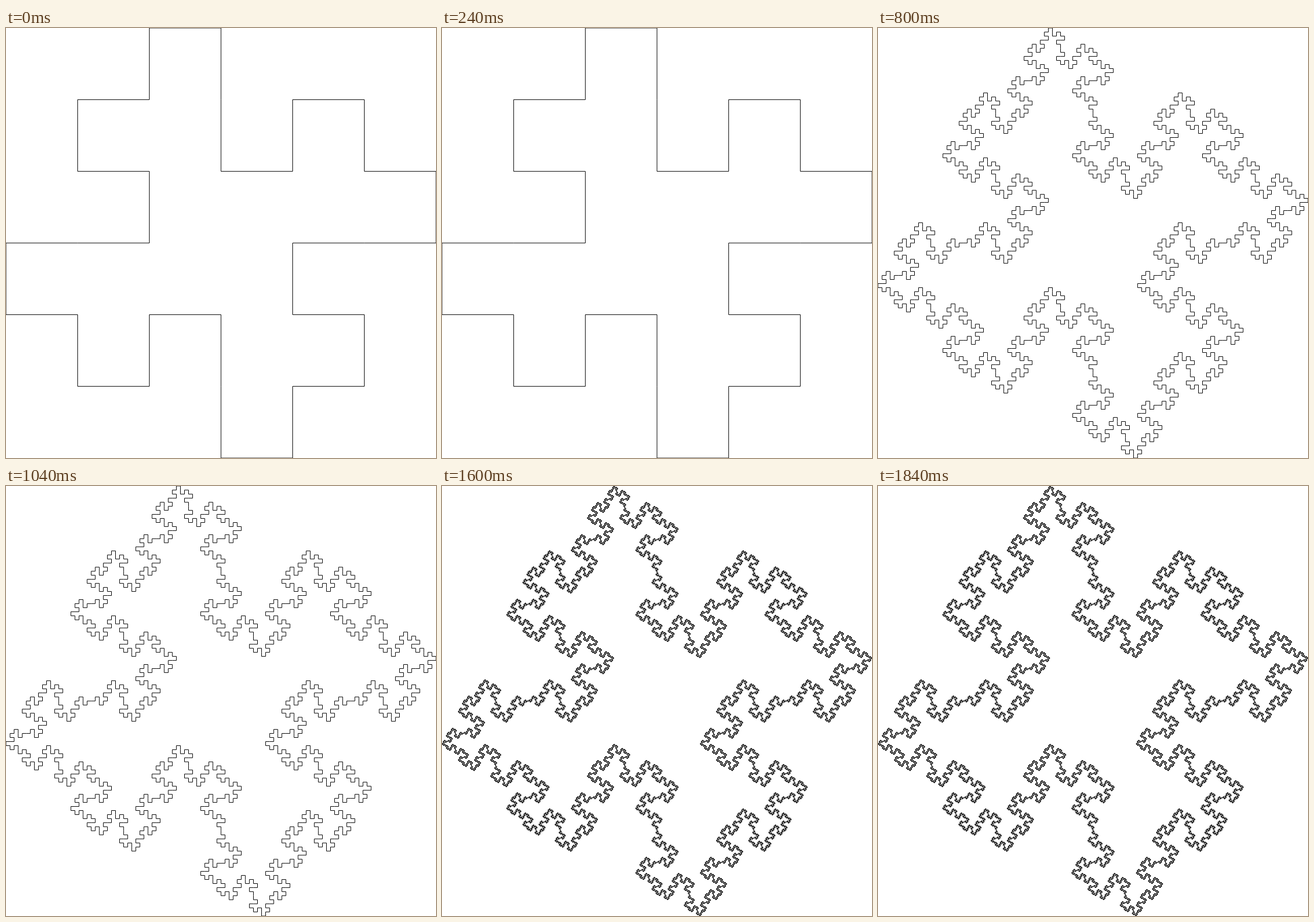
An HTML page with a canvas that plays this animation: 748x748 px, repeating every 2000 ms.

```html
<!DOCTYPE html>
<html lang="en">
<head>
<meta charset="utf-8">
<title>Quadratic Koch island</title>
<style>
  html, body { margin: 0; width: 100%; height: 100%; overflow: hidden; background: #fff; }
  canvas { display: block; }
</style>
</head>
<body>
<canvas id="stage" width="748" height="748"></canvas>
<script>
const SIZE = 748, LEVELS = 5, HOLD = 400;
const RIGHT = 1, LEFT = 3;

// Each edge becomes eight edges a quarter as long; values are quarter turns from its heading.
const RULE = [0, LEFT, 0, RIGHT, RIGHT, 0, LEFT, 0];
const STEP_X = [1, 0, -1, 0];
const STEP_Y = [0, 1, 0, -1];

const refine = headings => headings.flatMap(h => RULE.map(turn => (h + turn) % 4));

function drawIsland(headings, level) {
  const side = 4 ** level;
  const margin = (side - 1) / 3; // how far the curve reaches beyond the starting square
  const unit = SIZE / (side + 2 * margin);
  const layer = document.createElement('canvas');
  layer.width = layer.height = SIZE;
  const ctx = layer.getContext('2d');
  ctx.fillStyle = '#fff';
  ctx.fillRect(0, 0, SIZE, SIZE);

  let x = margin, y = margin;
  ctx.beginPath();
  ctx.moveTo(x * unit, y * unit);
  for (const h of headings) {
    x += STEP_X[h];
    y += STEP_Y[h];
    ctx.lineTo(x * unit, y * unit);
  }
  ctx.closePath();
  ctx.strokeStyle = '#000';
  ctx.lineWidth = 1;
  ctx.stroke();
  return layer;
}

const layers = [];
let headings = [0, 1, 2, 3];
for (let level = 1; level <= LEVELS; level++) {
  headings = refine(headings);
  layers.push(drawIsland(headings, level));
}

const stage = document.getElementById('stage').getContext('2d');
function render(time) {
  stage.drawImage(layers[Math.floor(time / HOLD) % LEVELS], 0, 0);
  requestAnimationFrame(render);
}
render(performance.now());
</script>
</body>
</html>
```
